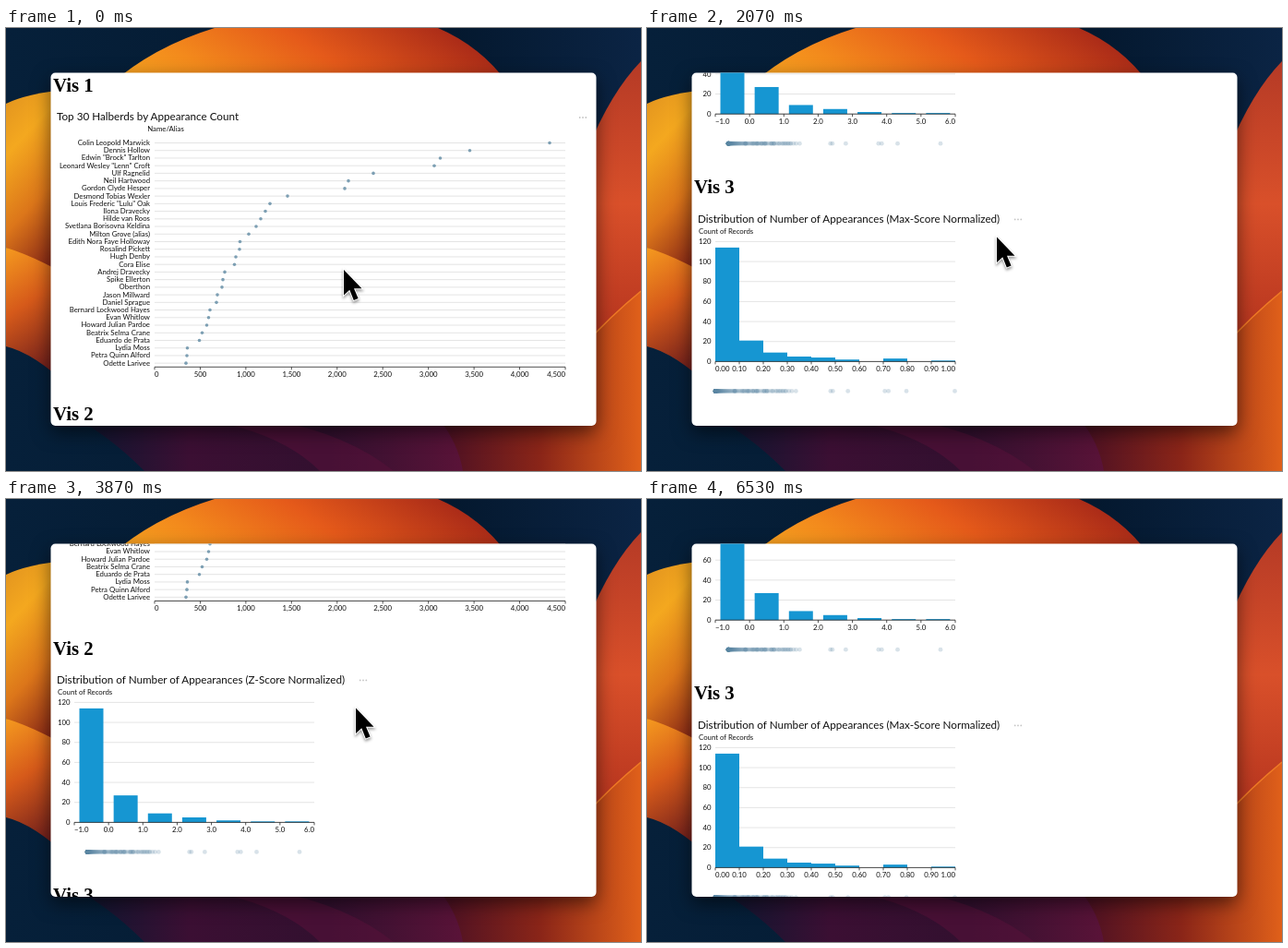
These frames come from a looping animation (688 by 480 pixels, 6.59 s). An HTML page:

```html
<!DOCTYPE html>
<html lang="en">
<head>
<meta charset="utf-8">
<title>Scrolling charts</title>
<style>
html, body { margin: 0; width: 100%; height: 100%; overflow: hidden; background: #06192f; }
svg { display: block; }
text { font: 7.8px Lato, sans-serif; fill: #111; }
.title { font-size: 11.7px; }
.head { font: bold 20.8px "Liberation Serif", "Times New Roman", serif; fill: #000; }
.grid { stroke: #dedddd; stroke-width: .8; }
.axis { stroke: #222; stroke-width: .8; }
.bar { fill: #1696d2; }
.window { filter: drop-shadow(0 7px 10px rgba(0,0,0,.55)); }
.cursor { filter: drop-shadow(0 2px 1.5px rgba(0,0,0,.4)); }
</style>
</head>
<body>
<svg width="688" height="480" viewBox="0 0 688 480">
  <defs>
    <linearGradient id="sky" x2="1"><stop stop-color="#06203a"/><stop offset=".7" stop-color="#04182e"/><stop offset="1" stop-color="#0b2444"/></linearGradient>
    <linearGradient id="dome" x1="0" y1=".8" x2="1" y2=".5"><stop stop-color="#f7ac22"/><stop offset=".3" stop-color="#f38a1c"/><stop offset=".62" stop-color="#e55a1a"/><stop offset="1" stop-color="#a92a18"/></linearGradient>
    <linearGradient id="left" x1="0" y1="0" x2=".35" y2="1"><stop stop-color="#e0921f"/><stop offset=".3" stop-color="#f4a81f"/><stop offset=".65" stop-color="#dc761a"/><stop offset="1" stop-color="#8c2a16"/></linearGradient>
    <linearGradient id="fold" x2=".3" y2="1"><stop stop-color="#f59a1f"/><stop offset=".45" stop-color="#d65a1a"/><stop offset="1" stop-color="#6c1c1c"/></linearGradient>
    <linearGradient id="right" x2="0" y2="1"><stop stop-color="#b53a26"/><stop offset=".5" stop-color="#d9502a"/><stop offset="1" stop-color="#b4331e"/></linearGradient>
    <linearGradient id="low" x2="1"><stop stop-color="#4a1024"/><stop offset=".5" stop-color="#8a2518"/><stop offset="1" stop-color="#e0601a"/></linearGradient>
    <linearGradient id="plum" x2="1"><stop stop-color="#0a1730"/><stop offset=".3" stop-color="#3b0f33"/><stop offset=".65" stop-color="#32102f"/><stop offset="1" stop-color="#5b1338"/></linearGradient>
    <clipPath id="clip"><rect x="48.5" y="48.5" width="591" height="382.5" rx="5"/></clipPath>
  </defs>
  <rect width="688" height="480" fill="url(#sky)"/>
  <path d="M112 62Q160 20 226 0H468Q515 20 545 62V90H112Z" fill="url(#dome)"/>
  <path d="M0 82Q22 71 70 66V280L0 238Z" fill="url(#left)"/>
  <path d="M0 238Q30 247 70 270V390Q30 352 0 345Z" fill="url(#fold)"/>
  <path d="M688 36Q655 70 630 132V345L688 285Z" fill="url(#right)"/>
  <path d="M70 420Q110 440 150 480H500L480 420Z" fill="url(#plum)"/>
  <path d="M220 425Q300 440 340 480H420Q370 440 290 425Z" fill="#551239" opacity=".6"/>
  <path d="M688 285Q655 312 625 345L470 425Q490 450 495 480H688Z" fill="url(#low)"/>
  <path d="M688 285Q655 312 625 345" fill="none" stroke="#ef7a25" stroke-width="1.5"/>
  <rect class="window" x="48.5" y="48.5" width="591" height="382.5" rx="5" fill="#fff"/>
  <g clip-path="url(#clip)"><g id="page"></g></g>
  <path id="cursor" class="cursor" d="M0 0V27.5L6.3 21.8L10.8 33L15.6 31L11 20.3H19.5Z" stroke="#fff" stroke-width="2" paint-order="stroke"/>
</svg>
<script>
const page = document.getElementById('page'), cursor = document.getElementById('cursor');
const LOOP = 6590;
const names = `Colin Leopold Marwick|Dennis Hollow|Edwin "Brock" Tarlton|Leonard Wesley "Lenn" Croft|Ulf Ragnelid|Neil Hartwood|Gordon Clyde Hesper|Desmond Tobias Wexler|Louis Frederic "Lulu" Oak|Ilona Dravecky|Hilde van Roos|Svetlana Borisovna Keldina|Milton Grove (alias)|Edith Nora Faye Holloway|Rosalind Pickett|Hugh Denby|Cora Elise|Andrej Dravecky|Spike Ellerton|Oberthon|Jason Millward|Daniel Sprague|Bernard Lockwood Hayes|Evan Whitlow|Howard Julian Pardoe|Beatrix Selma Crane|Eduardo de Prata|Lydia Moss|Petra Quinn Alford|Odette Larivee`.split('|');
const dotX = [589, 502.5, 470.5, 464, 398, 371, 367, 305, 286, 281, 276, 271, 263, 253.5, 253, 249, 247.5, 237, 235, 234, 229, 228, 221, 219.5, 217.5, 212.5, 209.5, 196.5, 196, 195];

const text = (x, y, s, anchor = 'start', cls = '') =>
  `<text x="${x}" y="${y}" text-anchor="${anchor}" class="${cls}">${s}</text>`;
const line = (x1, y1, x2, y2, cls) => `<path class="${cls}" d="M${x1} ${y1}L${x2} ${y2}"/>`;
const dot = (x, y, r, fill, alpha = 1) =>
  `<circle cx="${x}" cy="${y}" r="${r}" fill="${fill}" opacity="${alpha}"/>`;
const menu = (x, y) => [-3.3, 0, 3.3].map(d => dot(x + d, y, .9, '#c4c4c4')).join('');

// Horizontal axis whose end labels sit flush with the ends of the line
function axis(x, y, w, labels) {
  const last = labels.length - 1;
  return line(x, y, x + w, y, 'axis') + labels.map((s, i) => {
    const tx = x + w * i / last;
    return line(tx, y, tx, y + 3, 'axis') +
      text(tx, y + 10.8, s, i == 0 ? 'start' : i == last ? 'end' : 'middle');
  }).join('');
}

function ranking() {
  let s = text(55, 100, 'Top 30 Halberds by Appearance Count', 'start', 'title') +
    text(173, 112.2, 'Name/Alias', 'middle') + menu(625, 97);
  names.forEach((name, i) => {
    const y = 124.5 + 8.23 * i;
    s += line(161, y, 606, y, 'grid') + text(156, y + 2.4, name, 'end') + dot(dotX[i], y, 1.8, '#7d9fb3');
  });
  return s + axis(161, 367.3, 445, Array.from({length: 10}, (_, i) => (i * 500).toLocaleString('en')));
}

// Shares of the largest count: the ranked ones plus a long low tail
const shares = dotX.map(x => (x - 161) / 428);
for (let i = 0; i < 105; i++) shares.push(.4 * (i / 110) ** 4);

function histogram(y, kind, counts, x0, step, labels, stripX, stripW, menuX) {
  let s = text(55, y - 150.3, `Distribution of Number of Appearances (${kind}-Score Normalized)`, 'start', 'title') +
    text(56, y - 138.4, 'Count of Records') + menu(menuX, y - 154);
  for (let v = 0; v <= 120; v += 20) {
    const gy = y - v * 13 / 12;
    s += line(74, gy, 334, gy, 'grid') + text(69.5, gy + 2.7, v, 'end');
  }
  counts.forEach((n, i) => {
    const h = n * 13 / 12;
    s += `<rect class="bar" x="${x0 + step * i}" y="${y - h}" width="26" height="${h}"/>`;
  });
  return s + axis(74, y, 260, labels) +
    shares.map(p => dot(stripX + stripW * p, y + 32, 2.4, '#5b86a2', .24)).join('');
}

const zLabels = Array.from({length: 8}, (_, i) => (i - 1).toFixed(1).replace('-', '−'));
const maxLabels = Array.from({length: 11}, (_, i) => (i / 10).toFixed(2));
page.innerHTML =
  [69, 425.4, 693.2].map((y, i) => text(51, y, 'Vis ' + (i + 1), 'start', 'head')).join('') +
  ranking() +
  histogram(607.2, 'Z', [114, 27, 9, 5, 2, 1, 1], 79.5, 260 / 7, zLabels, 88, 230, 387) +
  histogram(875.4, 'Max', [114, 21, 9, 5, 4, 2, 0, 3, 0, 1], 74, 26, maxLabels, 74, 259.5, 402) +
  '<circle id="ring" cx="402" cy="721" r="9" fill="none" stroke="#eee"/>';
const ring = document.getElementById('ring');

// Eased interpolation through [time, value] keys
function track(keys, t) {
  const i = keys.findIndex(k => k[0] > t);
  if (i < 0) return keys.at(-1)[1];
  if (i == 0) return keys[0][1];
  const [t0, a] = keys[i - 1], [t1, b] = keys[i], u = (t - t0) / (t1 - t0);
  return a + (b - a) * u * u * (3 - 2 * u);
}
const scrollKeys = [[756, 0], [1800, 514], [2250, 514], [3200, 92], [3450, 92], [4400, 489], [4850, 476]];
const cursorX = [[100, 366], [750, 378], [2000, 379]];
const cursorY = [[100, 262], [750, 230], [1000, 230], [2000, 226.5]];

function draw() {
  const t = performance.now() % LOOP;
  page.setAttribute('transform', `translate(0 ${-track(scrollKeys, t)})`);
  cursor.setAttribute('transform', `translate(${track(cursorX, t)} ${track(cursorY, t)})`);
  cursor.style.display = t < 5000 ? '' : 'none';
  ring.style.display = t > 4800 && t < 5600 ? '' : 'none';
  requestAnimationFrame(draw);
}
draw();
</script>
</body>
</html>
```
